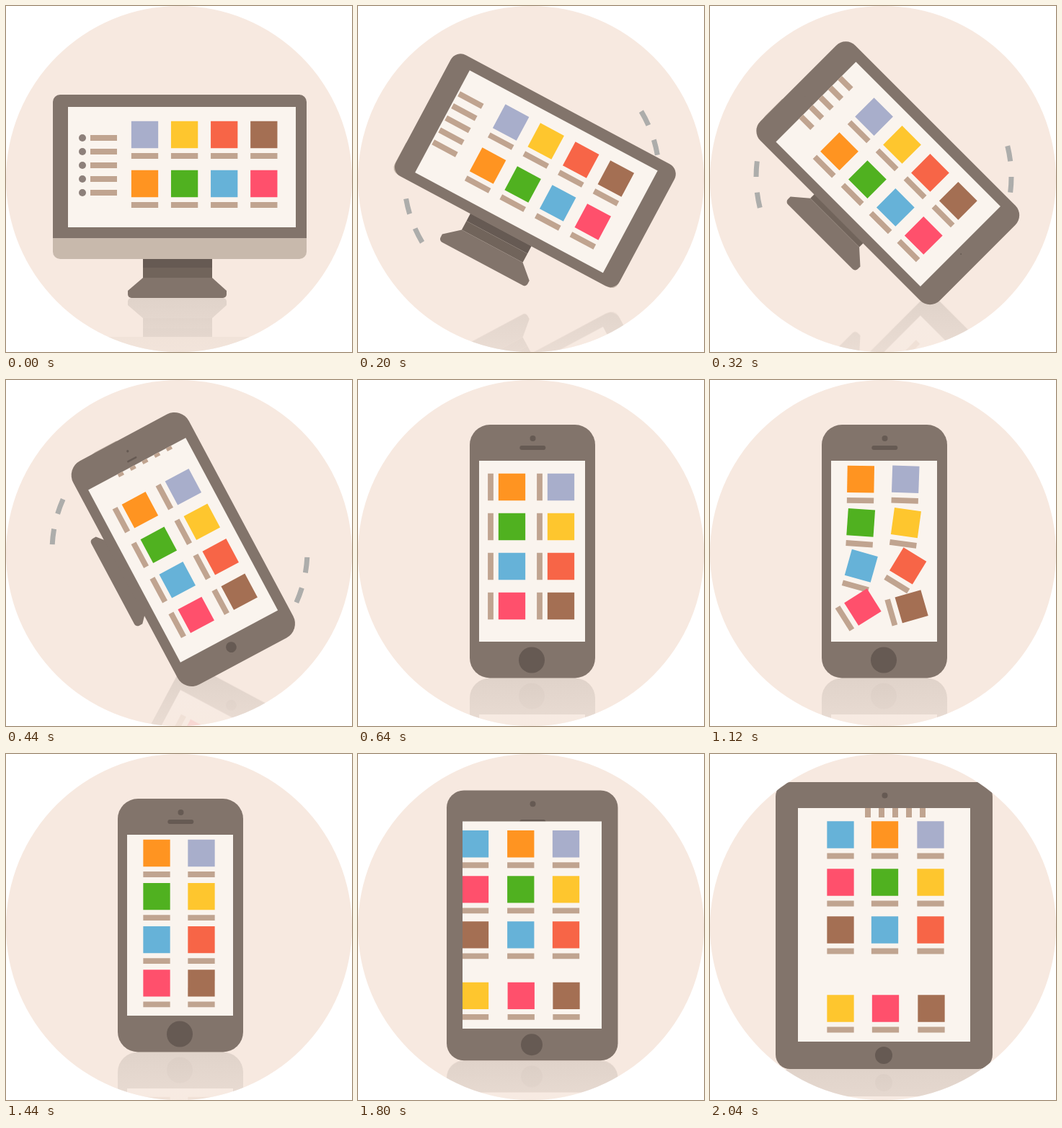
These frames come from a looping animation (480x480 px, 3360 ms). An HTML page with a canvas:

```html
<!DOCTYPE html>
<html lang="en">
<head>
<meta charset="utf-8">
<title>Responsive devices</title>
<style>
  html, body { margin: 0; width: 100%; height: 100%; overflow: hidden; background: #fff; }
  canvas { display: block; }
</style>
</head>
<body>
<canvas id="stage" width="480" height="480"></canvas>
<script>
const LOOP = 3360, STEP = 40;
const PIVOT = [241, 237];
const BACKDROP = '#f7e9e0', BODY = '#82746b', DARK = '#665a53', BAR = '#c0a490';
const LAVENDER = '#a8aecb', YELLOW = '#fec62e', RED = '#f76547', BROWN = '#a46f53';
const ORANGE = '#ff9421', GREEN = '#50b120', BLUE = '#66b2d8', PINK = '#ff506c';

// Three tile rows as the monitor sees them; the third only shows on the tablet.
const TILES = [
  [LAVENDER, YELLOW, RED, BROWN],
  [ORANGE, GREEN, BLUE, PINK],
  [BLUE, PINK, BROWN, YELLOW]
];

// Boxes [left, top, right, bottom] around the pivot for monitor, phone, tablet.
const BODY_BOXES = [[-176, -114, 176, 85], [-175, -88, 176.5, 86], [-198, -151, 200, 150]];
const SCREEN_BOXES = [[-155, -97, 161, 70], [-125, -74, 126, 73], [-162, -120, 162, 119]];

const stage = document.getElementById('stage').getContext('2d');
const layer = document.createElement('canvas');
layer.width = layer.height = 480;
const g = layer.getContext('2d');

const clamp = x => Math.max(0, Math.min(1, x));
const mix = (a, b, p) => a + (b - a) * p;
const mixAll = (a, b, p) => a.map((v, i) => mix(v, b[i], p));
const rad = deg => deg * Math.PI / 180;
const expoInOut = x => x <= 0 ? 0 : x >= 1 ? 1
  : x < .5 ? 2 ** (20 * x - 10) / 2 : 1 - 2 ** (10 - 20 * x) / 2;

function fillBox([x0, y0, x1, y1], color, radii = 0) {
  g.fillStyle = color;
  g.beginPath();
  g.roundRect(x0, y0, x1 - x0, y1 - y0, radii);
  g.fill();
}

function fillCentered(x, y, w, h, color, radius = 0) {
  fillBox([x - w / 2, y - h / 2, x + w / 2, y + h / 2], color, radius);
}

function fillDot(x, y, r, color) {
  fillCentered(x, y, 2 * r, 2 * r, color, r);
}

function drawStand(turn) {
  g.save();
  g.translate(0, -94 * turn);
  fillBox([-51, 114, 45, 126], DARK);
  fillBox([-51, 126, 45, 140], '#71645b');
  g.fillStyle = BODY;
  g.beginPath();
  g.moveTo(-51, 140);
  g.lineTo(-72, 158);
  g.arcTo(-72, 168, -60, 168, 5);
  g.arcTo(65, 168, 65, 158, 5);
  g.lineTo(65, 158);
  g.lineTo(45, 140);
  g.fill();
  fillBox([-176, 70, 176, 114], '#c8b9ac', [0, 0, 10, 10]);
  g.restore();
}

function drawList(turn) {
  const shift = -62 * turn;
  for (let i = 0; i < 5; i++) {
    const y = -54 + 19 * i;
    fillDot(-135 + shift, y, 5, '#8d807b');
    fillCentered(-105.5 + shift, y, 37, 8, BAR);
  }
}

function drawTile(row, col, t, turn, grow) {
  const order = 2 * col + 1 - row;
  const tidy = row === 2 ? 1 : expoInOut((t - 670 - 29 * order) / 580);
  const monitor = [-48.5 + 55.1 * col, -58.5 + 68 * row];
  const phone = [-88.5 + 55 * col, -40.5 + 68 * row];
  const list = [-99.5 + 60.1 * col, [-30, 32, 97][row]];
  const tablet = [[-125, -59, 7, 116][col], [-65, -1.5, 60][row] - (col === 3 && row < 2 ? 1 : 0)];
  const [x, y] = mixAll(mixAll(mixAll(monitor, phone, turn), list, tidy), tablet, grow);
  g.save();
  g.translate(x, y);
  g.rotate(rad(-90 * tidy));
  fillCentered(0, 0, 37.3, 37.3, TILES[row][col]);
  fillCentered(0, 29.5, 37.3, 7.8, BAR);
  g.restore();
}

function drawDevice(t, turn, grow) {
  const between = ([a, b, c]) => mixAll(mixAll(a, b, turn), c, grow);
  const screen = between(SCREEN_BOXES);
  const radius = mix(mix(10, 28, turn), 20, grow);
  const lowRadius = radius * clamp(3 * turn);
  const pop = clamp((turn - .47) / .53);

  g.clearRect(0, 0, 480, 480);
  g.save();
  g.translate(...PIVOT);
  g.rotate(rad(90 * turn));
  if (turn < 1) drawStand(turn);
  fillBox(between(BODY_BOXES), BODY, [radius, radius, lowRadius, lowRadius]);
  if (pop > 0) {
    fillDot(mix(151.5, 181, grow), 0, mix(18, 12, grow) * pop, DARK);
    fillDot(mix(-156, -179.5, grow), -1.5, 4 * pop, DARK);
    fillCentered(-143, -1.3, 6 * pop, 36 * pop, DARK, 3 * pop);
  }
  fillBox(screen, '#faf4ee');
  g.beginPath();
  g.rect(screen[0], screen[1], screen[2] - screen[0], screen[3] - screen[1]);
  g.clip();
  drawList(turn);
  TILES.forEach((colors, row) => colors.forEach((_, col) => drawTile(row, col, t, turn, grow)));
  g.restore();
}

function drawReflection(floor) {
  stage.save();
  stage.globalAlpha = .19;
  stage.translate(0, 2 * floor);
  stage.scale(1, -1);
  stage.drawImage(layer, 0, 0);
  stage.restore();
  const fade = stage.createLinearGradient(0, floor, 0, floor + 75);
  fade.addColorStop(0, 'rgba(247,233,224,0)');
  fade.addColorStop(1, 'rgba(247,233,224,.45)');
  stage.fillStyle = fade;
  stage.fillRect(0, floor, 480, 480 - floor);
}

function drawSpeedLines(turn) {
  stage.strokeStyle = '#adadab';
  stage.lineWidth = 7;
  for (const start of [-59, -45, 121, 135]) {
    const angle = start + 90 * turn;
    stage.beginPath();
    stage.arc(...PIVOT, 177, rad(angle), rad(angle + 7));
    stage.stroke();
  }
}

function render(t) {
  const turn = clamp(t / 640), grow = clamp((t - 1560) / 480);
  drawDevice(t, turn, grow);
  stage.clearRect(0, 0, 480, 480);
  stage.save();
  stage.beginPath();
  stage.arc(240, 240, 240, 0, 2 * Math.PI);
  stage.clip();
  stage.fillStyle = BACKDROP;
  stage.fillRect(0, 0, 480, 480);
  drawReflection(mix(mix(405, 413.5, turn), 437, grow));
  if (t >= 160 && t <= 480) drawSpeedLines(turn);
  stage.drawImage(layer, 0, 0);
  stage.restore();
}

const began = performance.now();
function tick() {
  const t = (performance.now() - began) % LOOP;
  render(Math.floor(t / STEP) * STEP);
  requestAnimationFrame(tick);
}
tick();
</script>
</body>
</html>
```
